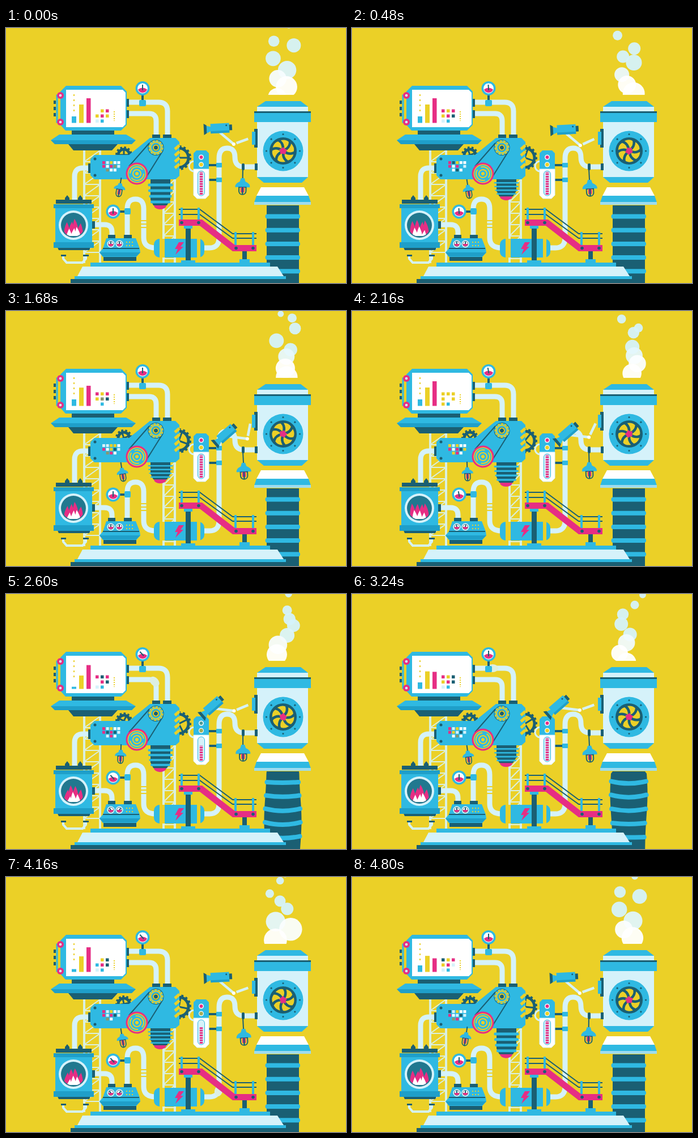
An HTML page that plays this animation: 600x450 px, repeating every 4.84 s.

```html
<!DOCTYPE html>
<html lang="en">
<head>
<meta charset="utf-8">
<title>Machine</title>
<style>
html, body { margin: 0; width: 100%; height: 100%; overflow: hidden; background: #ebd027; }
svg { display: block; width: 100vw; height: 100vh; }
.c { fill: #2fb9e2; } .d { fill: #1a5f73; } .l { fill: #d5f2fa; } .m { fill: #1f9fc9; }
.p { fill: #e62e84; } .w { fill: #fff; } .y { fill: #ebd027; }
.pipe { fill: none; stroke: #d5f2fa; stroke-width: 9; }
.ln { fill: none; stroke: #1a5f73; stroke-width: 2; }
.yl { fill: none; stroke: #ebd027; stroke-width: 2; }
.tower { fill: none; stroke: #d9f0e0; }
</style>
</head>
<body>
<svg viewBox="0 0 600 450">
<defs>
  <clipPath id="sky"><path d="M0 0H600V118H0z"/></clipPath>
  <clipPath id="fire"><circle cx="119" cy="348" r="20"/></clipPath>
  <g id="dial"><circle class="c" r="12.5"/><circle class="w" r="9"/><path class="p" d="M-8 2Q0 -4 8 2A8.5 8.5 0 0 1 -8 2z"/></g>
  <g id="mini"><circle class="w" r="6.5"/><circle class="d" r="5"/><circle class="w" r="4.2"/><path class="p" d="M-4 0H4A4 4 0 0 1 -4 0z"/></g>
  <g id="bulb">
    <path class="y" stroke="#1a5f73" stroke-width="1.5" d="M-5 0H5V7A5 6 0 0 1 -5 7z"/>
    <path class="p" d="M-2.5 0H2.5V9H-2.5z"/><path class="ln" stroke-width="1" d="M0 0V13"/>
  </g>
</defs>

<g id="smoke" clip-path="url(#sky)"></g>
<g id="towers"></g>

<g class="pipe">
  <path d="M121 304V262Q121 247 136 247H147"/>
  <path d="M157 347H174Q187 347 187 360V368"/>
  <path id="pipeA" d="M265 190V164Q265 151 252 151H216"/>
  <path id="pipeB" d="M216 131H269Q285 131 285 147V190"/>
  <path d="M214 368V319Q214 302 228.500 302Q243 302 243 319V370Q243 388 264 388"/>
  <path id="pipeC" d="M348 388H359Q376 388 376 370V230Q376 212 390 212Q404 212 404 228Q404 245 420 245H441"/>
  <path d="M101 402V407L107 414H135L141 407V402" stroke-width="4"/>
</g>
<path class="yl" d="M237 340H249M237 346H249M237 352H249"/>
<ellipse id="blob" rx="10" ry="7" fill="#dcefe2"/>

<!-- chimney -->
<g id="bellows"><path id="hose" class="d"/></g>
<path class="w" d="M450 281H526L534 296H442z"/>
<path class="c" d="M442 296H534L538 308H438z"/><path fill="#9edcee" d="M438 307H538V312H438z"/>
<path class="c" d="M458 129H520L533 139H443z"/>
<path class="l" d="M443 139H533V147H443zM443 165H533V263H443z"/>
<path class="d" d="M438 147H538V152H438z"/><path class="c" d="M438 150H538V166H438z"/>
<path class="c" d="M443 263H533L522 273H455z"/>
<path class="d" d="M438 178H444V211H438zM439 239H444V251H439z"/><path class="c" d="M434 183H440V206H434z"/>
<circle class="c" cx="489" cy="217" r="35.500"/><g id="bolts"></g>
<circle class="d" cx="489" cy="217" r="24"/>
<g id="fan"></g>

<!-- monitor -->
<path d="M97 119H90V166H97" fill="none" stroke="#2fb9e2" stroke-width="3"/>
<path class="d" d="M84 128H88V134H84zM84 139H88V145H84zM84 150H88V156H84zM211 125H217V139H211zM211 145H217V159H211z"/>
<path class="c" d="M106 102H203L213 112V171L203 181H105L96 171V112z"/>
<path class="w" d="M106 109H206L211 114V170L206 175H106z"/>
<g class="p"><circle cx="96" cy="119" r="6"/><circle cx="96" cy="166" r="6"/></g>
<g class="l"><circle cx="96" cy="119" r="2.300"/><circle cx="96" cy="166" r="2.300"/></g>
<path class="yl" stroke-width="3" stroke-dasharray="3 6" d="M120 117V148"/>
<path class="yl" stroke-dasharray="2 2" d="M191 147V164"/>
<rect id="bar0" class="c" x="116" width="8"/><rect id="bar1" class="y" x="129" width="8"/><rect id="bar2" class="p" x="142" width="7.500"/>
<g id="screenCells"></g>
<path class="d" d="M116 181H191V188H116zM110 205H197L187 216H119z"/>
<path class="c" d="M94 188H212L229 198H79z"/><path class="m" d="M79 198H229L222 205H86z"/>

<!-- upper gauge -->
<path class="d" d="M239 117H243V129H239z"/><rect class="c" x="235" y="127" width="12" height="11" rx="2"/>
<use href="#dial" x="241" y="106.500"/><path id="needle0" class="ln" stroke="#e62e84" d="M0 3V-7"/>

<!-- engine -->
<g id="gearA"></g><g id="gearB"></g>
<circle cx="332" cy="244" r="9" fill="none" stroke="#d5f2fa" stroke-width="3"/>
<path class="d" d="M145 239H150V256H145zM258 188H272V195H258zM277 188H292V195H277z"/>
<path class="c" d="M156 224H217L254 194H299L306 201V261L299 267H156L149 260V231z"/>
<path d="M298 214L306 207M298 225L306 218M298 236L306 229M298 247L306 240" stroke="#ebd027" stroke-width="5"/>
<g class="d"><circle cx="157" cy="231" r="2.500"/><circle cx="157" cy="260" r="2.500"/></g>
<path class="ln" d="M253 203L217 244M277 216L247 264"/>
<g id="wheelA"><circle class="d" r="14"/><circle class="c" r="13"/><circle class="yl" r="12" stroke-width="3" stroke-dasharray="3.770 2.513"/><circle class="yl" r="9.500"/><circle class="d" r="6"/><circle class="yl" r="4.500"/></g>
<g id="wheelB"><circle class="p" r="19.500"/><circle class="y" r="16.500"/><circle class="c" r="15"/><circle class="yl" r="12" stroke-dasharray="30 7.700"/><circle class="yl" r="7"/><circle class="y" r="3"/></g>
<g id="consoleCells"></g>
<ellipse id="tip" class="p" cx="272" rx="11" ry="7"/><path id="cone" class="d"/><g id="ribs"></g>
<g id="lampA"><path class="ln" d="M0 -3V9"/><path class="c" d="M-3 7H3L4 11Q11 14 10 18H-10Q-11 14 -4 11z"/><use href="#bulb" y="18"/></g>

<!-- furnace -->
<path class="d" d="M88 303H151V310H88zM90 385H150L147 392H93zM152 341H157V354H152zM97 400H106V403H97zM136 400H146V403H136z"/>
<path class="d" d="M104 300L108 295L112 300V303H104zM127 300L131 295L135 300V303H127z"/>
<path class="c" d="M87 311H152V387H87z"/><path class="m" d="M84 311H155V318H84zM84 378H155V388H84z"/>
<circle class="l" cx="119" cy="348" r="26"/><circle cx="119" cy="348" r="22" fill="#21788f"/>
<g clip-path="url(#fire)"><path id="flame" class="p"/><path id="core" class="w"/></g>

<!-- press -->
<path class="d" d="M180 365H193V372H180zM208 365H222V372H208zM172 402H230V411H172zM200 322H211V326H200z"/>
<path class="c" d="M177 371H229L236 389L237 396L230 404H171L165 396L171 389z"/><path class="m" d="M165 396H237L230 403H171z"/>
<path class="d" d="M171 388H235V390H171z"/>
<use href="#mini" x="185" y="381"/><use href="#mini" x="200" y="381"/>
<path id="needle2" class="ln" stroke-width="1" d="M0 0V-4"/><path id="needle3" class="ln" stroke-width="1" d="M0 0V-4"/>
<path class="yl" stroke-dasharray="2 3" d="M212 378H226M212 384H226"/>
<rect class="c" x="209" y="318" width="11" height="11" rx="2"/>
<use href="#dial" x="189" y="324"/><path id="needle1" class="ln" d="M0 3V-7"/>

<!-- tank -->
<rect class="c" x="261" y="372" width="89" height="33" rx="10"/>
<path class="y" d="M271 372H280V405H271zM337 372H343V405H337z"/>
<path class="p" d="M305 378H314L308 386H313L299 400L303 390H298z"/>

<!-- base -->
<path class="c" d="M149 414H466V422H149z"/><path class="l" d="M135 421H479L490 438H126z"/>
<path class="c" d="M121 438H494V444H121z"/><path class="d" d="M114 443H516V450H114z"/>

<!-- stairs -->
<path class="d" d="M317 350H326V412H317zM417 394H425V410H417z"/>
<path class="c" d="M314 349H329V354H314zM309 410H334V415H309zM412 408H430V415H412z"/>
<path class="ln" d="M305 320H342L400 363H442M305 329H342L400 371H442"/>
<path class="c" d="M308 317H312V341H308zM338 317H342V341H338zM403 360H407V385H403zM434 360H438V385H434z"/>
<path class="p" d="M305 338H346L404 383H442V394H400L342 349H305z"/>
<g class="d"><circle cx="310" cy="343.500" r="2.800"/><circle cx="340" cy="343.500" r="2.800"/><circle cx="406" cy="388.500" r="2.800"/><circle cx="436" cy="388.500" r="2.800"/></g>

<!-- thermometer -->
<path class="d" d="M357 240H372V244H357zM357 266H372V270H357z"/>
<path class="c" d="M371 238H381V246H371zM371 264H381V272H371zM336 216H353L358 221V251H331V221z"/>
<path class="w" stroke="#d5f2fa" d="M331 249H358V295L352 301H337L331 295z"/>
<rect x="338.500" y="252" width="12" height="44" rx="6" fill="#d5f2fa" stroke="#2fb9e2"/>
<path id="mercury" stroke="#e62e84" stroke-width="5.500" stroke-dasharray="3 1.300"/>
<circle class="w" cx="344.500" cy="228" r="4.500"/><circle class="w" cx="344.500" cy="241" r="4.500"/>
<circle id="led0" cx="344.500" cy="228" r="3"/><circle id="led1" cx="344.500" cy="241" r="3.300"/>

<rect class="d" x="416" y="239" width="5" height="12" rx="2"/>
<g id="lampB"><path class="ln" d="M0 0V24"/><path class="c" d="M-3 20H3L5 26Q14 30 13 36H-13Q-14 30 -5 26z"/><use href="#bulb" transform="translate(0 36) scale(1.25 1)"/></g>

<!-- camera -->
<path id="arm" fill="none" stroke="#d5f2fa" stroke-width="4.500"/><circle id="elbow" class="w" r="3"/>
<g id="cam"><path class="c" d="M-24 -14L-17 -12V-17H16V0H-17V-4L-24 -1z"/><path class="d" d="M-29 -18L-24 -15V-1L-29 2zM16 -14H21V-4H16z"/><path class="m" d="M-17 -4H16V0H-17z"/><circle class="d" cx="11" cy="-13" r="1.500"/></g>
</svg>
<script>
const LOOP = 4840, STEP = 40, CYCLE = 1600, PUMP = LOOP / 4;
const C = { c: '#2fb9e2', d: '#1a5f73', l: '#d5f2fa', p: '#e62e84', w: '#fff', y: '#ebd027', g: '#8a9670' };
const $ = id => document.getElementById(id);
const set = (el, attrs) => { for (const k in attrs) el.setAttribute(k, attrs[k]); };
const add = (parent, tag, attrs = {}) => {
  const el = document.createElementNS('http://www.w3.org/2000/svg', tag);
  set(el, attrs);
  return parent.appendChild(el);
};
const times = (n, fn) => Array.from({ length: n }, (_, i) => fn(i));
const clamp = v => Math.min(1, Math.max(0, v));
const hash = n => { const s = Math.sin(n * 127.1 + 11.7) * 43758.5453; return s - Math.floor(s); };
const polar = (x, y, r, deg) => [x + r * Math.cos(deg * Math.PI / 180), y + r * Math.sin(deg * Math.PI / 180)];
const spin = (id, x, y, deg) => set($(id), { transform: `translate(${x} ${y}) rotate(${deg})` });

// Smooth step from 0 to 1
const ease = (t, from, to) => { const k = clamp((t - from) / (to - from)); return k * k * (3 - 2 * k); };
// 0-1-0 bump, started again every cycle
const pulse = (t, from, to) => Math.max(...times(3, i => Math.sin(Math.PI * clamp((t - i * CYCLE - from) / (to - from))) ** 2));

// Repeated static parts
for (const [a, b, top] of [[138, 166, 216], [278, 298, 267]]) {
  add($('towers'), 'path', { class: 'tower', 'stroke-width': 4, d: `M${a} ${top}V415M${b} ${top}V415` });
  let d = '';
  for (let y = top; y < 395; y += 20) d += `M${a} ${y + 20}L${b} ${y}M${a} ${y + 20}H${b}`;
  add($('towers'), 'path', { class: 'tower', 'stroke-width': 2, d });
}
times(8, i => {
  const [cx, cy] = polar(489, 217, 29.5, i * 45);
  add($('bolts'), 'circle', { cx, cy, r: 1.6, class: 'd' });
});
times(6, i => add($('fan'), 'path', { class: 'y', transform: `rotate(${i * 60})`, d: 'M2 -4Q3 -12 -4 -19Q5 -21 10 -16Q10 -8 2 -4z' }));
add($('fan'), 'path', { class: 'p', d: 'M0 -7L3 -4L7 -2L5 2L4 6L0 5L-5 5L-5 1L-7 -3L-3 -4z' });

function gear(id, r, teeth) {
  const half = Math.PI * (r + 1) / teeth;
  add($(id), 'circle', { r: r - 2, fill: 'none', stroke: C.d, 'stroke-width': 5 });
  add($(id), 'circle', { r: r + 1, fill: 'none', stroke: C.d, 'stroke-width': 4, 'stroke-dasharray': half });
  add($(id), 'path', { d: `M${-r} 0H${r}M0 ${-r}V${r}`, stroke: C.d, 'stroke-width': 3 });
}
gear('gearA', 12, 12);
gear('gearB', 19, 16);

// Rows of cells, written as start and end column
const cells = (id, x, y, pitch, size, rows) => rows.flatMap(([from, to], j) => times(to - from, i =>
  add($(id), 'rect', { x: x + (from + i) * pitch, y: y + j * pitch, width: size, height: size })));
const screen = cells('screenCells', 158, 143.5, 9, 5.5, [[0, 3], [0, 3], [0, 2]]);
const panel = cells('consoleCells', 170, 235, 6.6, 5, [[0, 5], [0, 5], [1, 4]]);
const ribs = times(4, () => add($('ribs'), 'rect', { class: 'c', rx: 2 }));
const rings = times(5, () => add($('bellows'), 'path', { fill: 'none', stroke: C.c, 'stroke-width': 8, 'stroke-linecap': 'round' }));
const puffs = times(24, () => add($('smoke'), 'circle'));

// Puffs leave the chimney at an even rate, drift, and shrink as they rise
function drawSmoke(t) {
  puffs.forEach((el, i) => {
    const age = (t - i * LOOP / puffs.length + LOOP) % LOOP / 1000;
    const side = hash(i + 5) - .5;
    const cy = 122 - age * (78 + 14 * hash(i + 60));
    const r = (15 + 8 * hash(i + 30)) * clamp(1.05 - age / 2);
    const k = clamp((cy - 70) / 25);
    set(el, {
      cx: 486 + side * (30 + 18 * age), cy, r, 'fill-opacity': .95,
      fill: `rgb(${213 + 42 * k},${242 + 13 * k},${250 + 5 * k})`
    });
  });
}

function drawCells(t) {
  const paint = (list, base, seed) => list.forEach((el, i) => {
    const n = Math.floor(t / 400 + hash(i + seed));
    const flip = hash(i * 3.3 + n * 7.9 + seed) < .25;
    set(el, { fill: C[flip ? 'lydcwg'[Math.floor(hash(i + n * 5) * 6)] : base[i]] });
  });
  paint(screen, 'pypypdlc', 3);
  paint(panel, 'plywwpwpdlgpw', 40);
}

function drawReadings(t) {
  const tops = [156 + 9 * pulse(t, 700, 1500), 135 + 32 * pulse(t, 850, 1700), 124 + 43 * pulse(t, 950, 1800)];
  tops.forEach((y, i) => set($('bar' + i), { y, height: 167.5 - y }));

  const heat = pulse(t, 750, 1500);
  set($('mercury'), { d: `M344.500 294V${254 + 18 * heat}` });
  set($('led0'), { fill: heat < .7 ? C.p : '#4f9c96' });
  set($('led1'), { fill: heat < .5 ? C.y : '#a5ac55' });

  const swing = -42 * pulse(t, 350, 1600);
  spin('needle0', 241, 107, swing);
  spin('needle1', 189, 325, swing);
  spin('needle2', 185, 381, swing);
  spin('needle3', 200, 381, -swing);
}

// The piston and both lamps share one beat
function drawPump(t) {
  const s = ((1 + Math.cos(2 * Math.PI * t / PUMP)) / 2) ** 2;
  const h = 30 + 16 * s, end = 267 + h;
  set($('cone'), { d: `M255 267H290V${end - 10}L284 ${end}H260L255 ${end - 10}z` });
  set($('tip'), { cy: end });
  ribs.forEach((el, i) => {
    const w = 44 - i * i;
    set(el, { x: 272.5 - w / 2, y: 267 + h * (i + .75) / 4.6, width: w, height: 2.5 + 2.5 * s });
  });
  spin('lampA', 203, 270 - 3 * s, 18 * s - 9);
  spin('lampB', 418, 248 - 3 * s, 4 * s - 3);
}

// A swelling climbs the hose
function drawHose(t) {
  const amp = ease(t, 2200, 2550) - ease(t, 3300, 3650);
  const mid = 400 - (t - 2600) * .075;
  const bulge = y => amp * 4.5 * Math.exp(-(((y - mid) / 55) ** 2));
  let left = 'M460 313', right = '';
  for (let y = 317; y <= 450; y += 7) {
    left += `L${460 - bulge(y)} ${y}`;
    right = `L${517 + bulge(y)} ${y}` + right;
  }
  set($('hose'), { d: left + right + 'L517 313z' });
  rings.forEach((el, i) => {
    const y = 332.5 + i * 24.2, b = bulge(y);
    set(el, { d: `M${461.5 - b} ${y - b / 2}Q488 ${y + b * 1.4} ${515 + b} ${y - b / 2}` });
  });
}

function drawFlame(t) {
  const fire = (width, top, n) => times(n, i => {
    const x = 119 + width * (i / (n - 1) - .5), half = width / n * .8;
    const wave = Math.sin(2 * Math.PI * (t * 6 / LOOP + i * .37));
    const y = top + 3 * Math.abs(i - (n - 1) / 2) + 3 * wave, lean = 2 * wave;
    return `M${x - half} 367Q${x - half - 2} ${y + 13} ${x + lean} ${y}Q${x + half + 2} ${y + 13} ${x + half} 367z`;
  }).join('');
  set($('flame'), { d: fire(23, 338, 4) });
  set($('core'), { d: fire(15, 351, 3) });
}

// A lump runs through each pipe at one speed
function drawBlob(t) {
  const starts = { pipeA: 2510, pipeB: 3160, pipeC: 4080 };
  const id = Object.keys(starts).find(k => t >= starts[k] && (t - starts[k]) * .4 < $(k).getTotalLength());
  set($('blob'), { visibility: id ? 'visible' : 'hidden' });
  if (!id) return;
  const at = (t - starts[id]) * .4;
  const [a, p, b] = [-2, 0, 2].map(d => $(id).getPointAtLength(at + d));
  spin('blob', p.x, p.y, Math.atan2(b.y - a.y, b.x - a.x) * 180 / Math.PI);
}

function drawCamera(t) {
  const fold = ease(t, 300, 1400) - ease(t, 1900, 2700);
  const tilt = ease(t, 1000, 1600) - ease(t, 3400, 4100);
  const upper = 160 - 59 * fold;
  const [ex, ey] = polar(432, 194, 32, upper), [mx, my] = polar(ex, ey, 32, 220 - 33 * tilt);
  const [ax, ay] = polar(ex, ey, 5, upper + 180), [bx, by] = polar(432, 194, 5, upper);
  set($('arm'), { d: `M${mx} ${my}L${ex} ${ey}M${ax} ${ay}L${bx} ${by}` });
  set($('elbow'), { cx: ex, cy: ey });
  spin('cam', mx + 1, my + 1, -3 - 38 * tilt);
}

function drawWheels(t) {
  const turn = t / LOOP * 360;
  spin('fan', 489, 217, turn * 3);
  spin('gearA', 208, 224, turn * 2);
  spin('gearB', 305, 229, -turn * 2);
  spin('wheelA', 264.5, 211, turn * 2);
  spin('wheelB', 231, 257, turn * 2);
}

const parts = [drawSmoke, drawCells, drawReadings, drawPump, drawHose, drawFlame, drawBlob, drawCamera, drawWheels];

function tick() {
  const t = Math.floor(performance.now() % LOOP / STEP) * STEP;
  parts.forEach(draw => draw(t));
  requestAnimationFrame(tick);
}
tick();
</script>
</body>
</html>
```
